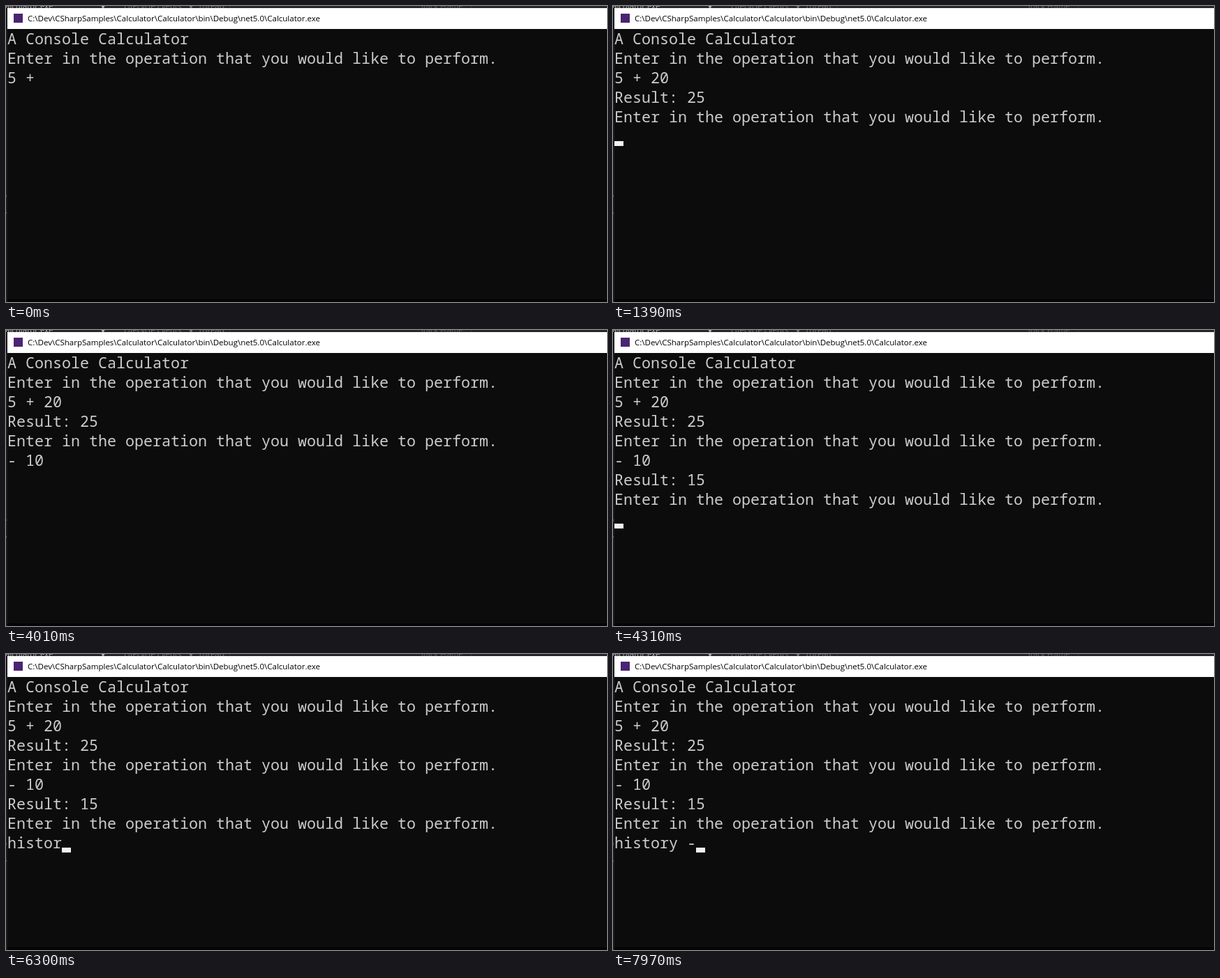
An HTML page with a canvas for the animation above (8000 ms loop, 861 px wide and 425 px high).

```html
<!DOCTYPE html>
<html lang="en">
<head>
<meta charset="utf-8">
<title>Console calculator</title>
<style>
  html, body { margin: 0; width: 100%; height: 100%; overflow: hidden; background: #0c0c0c; }
  canvas { display: block; }
</style>
</head>
<body>
<canvas id="stage" width="861" height="425"></canvas>
<script>
const ctx = document.getElementById('stage').getContext('2d', { alpha: false });
const LOOP = 8000;
const CELL = { w: 13, h: 28, left: 2, top: 33, baseline: 22 };
const UI_FONT = '"Open Sans", "Noto Sans", sans-serif';
const MONO_FONT = '21.667px "Noto Sans Mono", "DejaVu Sans Mono", monospace';

const prompt = 'Enter in the operation that you would like to perform.';
const start = ['A Console Calculator', prompt];
const afterAdd = [...start, '5 + 20', 'Result: 25', prompt];
const afterSubtract = [...afterAdd, '- 10', 'Result: 15', prompt];

// [time in ms, finished lines, text being typed, cursor visible]
const steps = [
  [0, start, '5 + ', false],
  [280, start, '5 + ', true],
  [560, start, '5 + 2', true],
  [690, start, '5 + 20', true],
  [810, start, '5 + 20', false],
  [1390, afterAdd, '', true],
  [2380, afterAdd, '', false],
  [2920, afterAdd, '', true],
  [3320, afterAdd, '-', true],
  [3470, afterAdd, '- ', true],
  [3750, afterAdd, '- 1', true],
  [3880, afterAdd, '- 10', true],
  [4010, afterAdd, '- 10', false],
  [4310, afterSubtract, '', true],
  [4990, afterSubtract, '', false],
  [5540, afterSubtract, '', true],
  [5660, afterSubtract, 'h', true],
  [5780, afterSubtract, 'his', true],
  [5900, afterSubtract, 'hist', true],
  [6030, afterSubtract, 'histo', true],
  [6300, afterSubtract, 'histor', true],
  [6450, afterSubtract, 'history', true],
  [6570, afterSubtract, 'history ', false],
  [7140, afterSubtract, 'history ', true],
  [7720, afterSubtract, 'history ', false],
  [7970, afterSubtract, 'history -', true]
];

function box(color, x, y, w, h) {
  ctx.fillStyle = color;
  ctx.fillRect(x, y, w, h);
}

function label(text, x, y, size, color) {
  ctx.font = `${size}px ${UI_FONT}`;
  ctx.fillStyle = color;
  ctx.fillText(text, x, y);
}

function drawWindow() {
  box('#0c0c0c', 0, 0, 861, 425);
  // Toolbar sliver above the window
  box('#29252a', 0, 0, 861, 3);
  label('alculator.exe', -1, 4, 11.5, '#b0b0b0');
  label('▾', 136, 5, 12, '#b0b0b0');
  label('Lifecycle Events', 169, 4, 11.3, '#777478');
  label('▾', 262, 5, 12, '#777478');
  label('Thread:', 275, 4, 11.5, '#777478');
  label('Stack Frame:', 592, 4, 11, '#625f63');
  box('#3a363b', 320, 0, 1, 3);
  box('#3a363b', 666, 0, 1, 3);
  // Left and bottom edges
  box('#1c1b1d', 0, 3, 2, 422);
  box('#5a5a5a', 0, 272, 1, 2);
  box('#5a5a5a', 0, 296, 1, 2);
  box('#060304', 2, 421, 859, 4);
  // Title bar
  box('#ffffff', 2, 3, 859, 30);
  box('#4b2472', 11, 11, 13, 13);
  label('C:\\Dev\\CSharpSamples\\Calculator\\Calculator\\bin\\Debug\\net5.0\\Calculator.exe',
    31, 22, 11.53, '#000000');
}

function drawLine(text, row) {
  const y = CELL.top + row * CELL.h + CELL.baseline;
  [...text].forEach((char, col) => ctx.fillText(char, CELL.left + col * CELL.w, y));
}

function drawStep([, lines, typed, cursor]) {
  drawWindow();
  ctx.font = MONO_FONT;
  ctx.fillStyle = '#cccccc';
  [...lines, typed].forEach(drawLine);
  if (cursor) {
    const bottom = CELL.top + (lines.length + 1) * CELL.h;
    box('#f2f2f2', CELL.left + typed.length * CELL.w, bottom - 7, CELL.w, 7);
  }
}

const origin = performance.now();
let shown = null;

function tick() {
  const time = (performance.now() - origin) % LOOP;
  const step = steps.filter(([at]) => at <= time).pop();
  if (step !== shown) drawStep(shown = step);
  requestAnimationFrame(tick);
}
tick();
</script>
</body>
</html>
```
